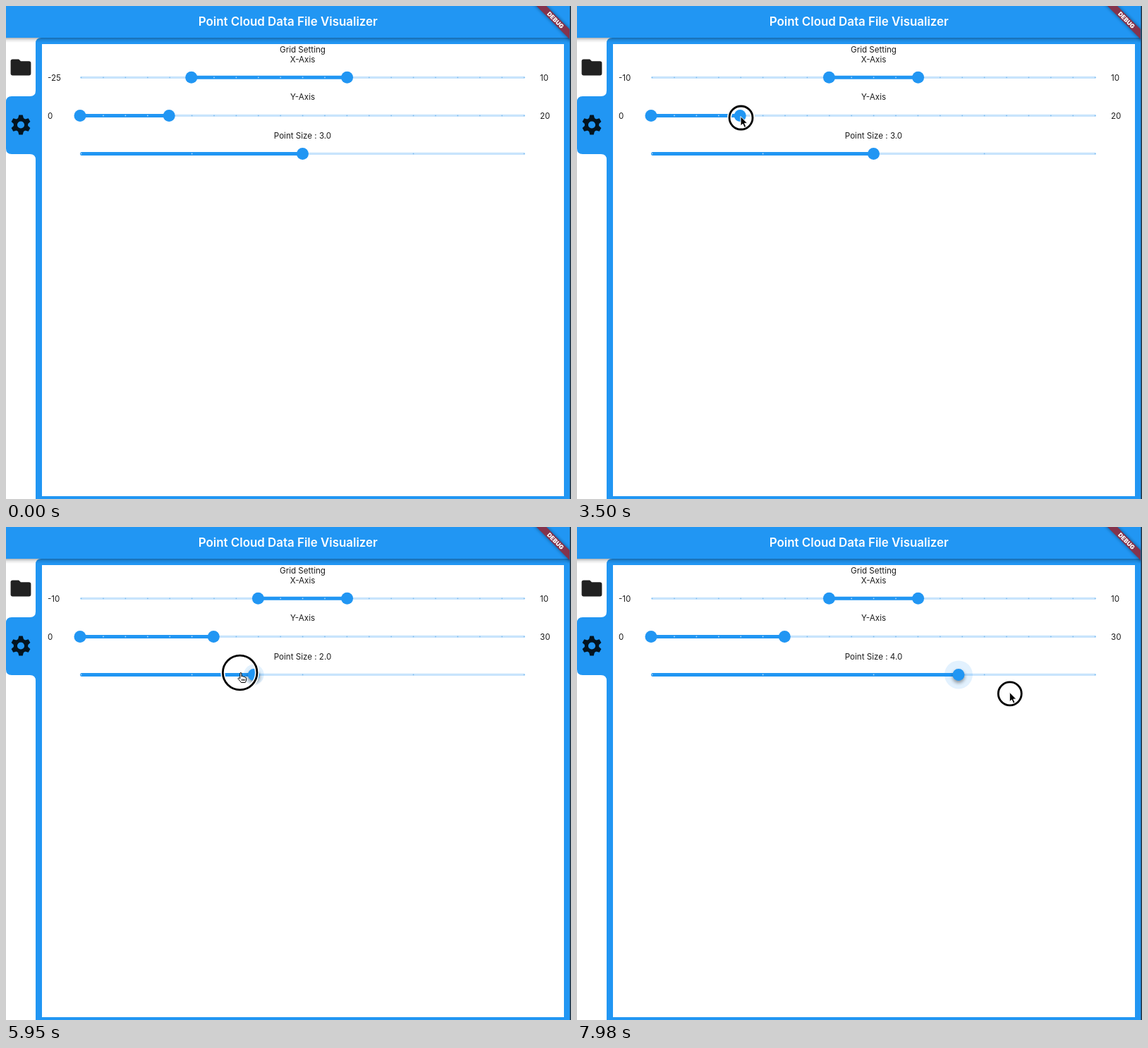
Write an HTML page that moves like this. It is 801 by 699 pixels and loops after 8000 ms.

```html
<!DOCTYPE html>
<html lang="en">
<head>
<meta charset="utf-8">
<title>Point Cloud Data File Visualizer</title>
<style>
  html, body { margin: 0; width: 100%; height: 100%; overflow: hidden; background: #fff; }
  svg { display: block; width: 801px; height: 699px; }
  text { font: 11.6px Inter, "Open Sans", sans-serif; fill: #1c1c1c; }
  .mid { text-anchor: middle; }
  .title { font-size: 16.9px; font-weight: 600; fill: #fff; }
  .debug { font-size: 8.4px; font-weight: 900; fill: #fff; }
  .blue { fill: #2196f3; }
  .halo { fill: #2196f3; fill-opacity: .13; }
</style>
</head>
<body>
<svg viewBox="0 0 801 699">
  <defs>
    <linearGradient id="shade" x2="0" y2="1">
      <stop offset="0" stop-opacity=".3"/>
      <stop offset=".45" stop-opacity=".1"/>
      <stop offset="1" stop-opacity="0"/>
    </linearGradient>
    <filter id="blur" x="-50%" y="-50%" width="200%" height="200%"><feGaussianBlur stdDeviation="2.4"/></filter>
    <clipPath id="bar"><path d="M0 0H799V699H0z"/></clipPath>
  </defs>

  <!-- side tabs and panel -->
  <path class="blue" d="M800 45V699H42V218Q42 210 34 210H8Q0 210 0 202V136Q0 128 8 128H34Q42 128 42 120V53Q42 45 50 45z"/>
  <path fill="#fff" d="M51 54H791V695H51z"/>
  <path fill="#212121" transform="translate(3.7 69.7) scale(1.44)"
    d="M10 4H4Q2 4 2 6V18Q2 20 4 20H20Q22 20 22 18V8Q22 6 20 6H12z"/>
  <g id="gear" fill="#04141f" transform="translate(21 168.5) scale(1.42)">
    <circle r="5.4" fill="none" stroke="#04141f" stroke-width="3.6"/>
  </g>

  <!-- header -->
  <path fill="url(#shade)" d="M0 45H799V52H0z"/>
  <path class="blue" d="M0 0H800V45H0z"/>
  <text class="mid title" x="399.8" y="28">Point Cloud Data File Visualizer</text>
  <g clip-path="url(#bar)">
    <g transform="translate(799 0) rotate(45)">
      <path d="M-40 23.3H40V33.2H-40z" opacity=".45" filter="url(#blur)"/>
      <path fill="#84334c" d="M-40 23.3H40V33.2H-40z"/>
      <text class="mid debug" y="31.3">DEBUG</text>
    </g>
  </g>
  <path fill="#26303a" d="M799.5 0H801V699H799.5z"/>

  <text class="mid" x="420.5" y="66">Grid Setting</text>
  <text class="mid" x="420.5" y="79.6">X-Axis</text>
  <text class="mid" x="420.5" y="133.4">Y-Axis</text>
  <text class="mid" x="420.5" y="187.5" id="sizeText"></text>
  <text x="59" y="106.3" id="xLow"></text>
  <text x="757" y="106.3">10</text>
  <text x="59" y="160.4">0</text>
  <text x="757" y="160.4" id="yHigh"></text>

  <g id="sliders"></g>

  <g id="pointer">
    <g id="ring" fill="none">
      <circle cx=".5" cy="1.5" stroke="#fff" stroke-width="6"/>
      <circle cx=".5" cy="1.5" stroke="#000" stroke-width="2.8"/>
    </g>
    <path id="arrow" stroke="#fff" d="M0 -.5V13L3.1 10.2L5.3 15.2L7.7 14.1L5.5 9.3H9.6z"/>
    <path id="hand" fill="#fff" stroke="#000" stroke-linejoin="round"
      d="M.6 10V3Q.6 1.5 1.7 1.5Q2.8 1.5 2.8 3V7Q4.6 5.6 5.3 7.4Q7 6.4 7.5 8.2Q9.4 7.6 9.4 9.6V12Q9 14 8 15.5H2.2Q1 13.4 -2 10.5Q-2.4 8.6 -.6 9zM3.4 10.5V13M5.2 10.5V13M7 10.5V13"/>
  </g>
</svg>
<script>
const $ = id => document.getElementById(id);
const LOOP = 8000, STEP = 70, LEFT = 105, WIDTH = 631;
const PRESS_X = 1540, FREE_X = 2240, PRESS_Y = 3500, FREE_Y = 4620, HOVER = 4760, PRESS_SIZE = 5600;

const set = (el, attrs) => { for (const k in attrs) el.setAttribute(k, attrs[k]); };
const show = (el, on) => set(el, { visibility: on ? 'visible' : 'hidden' });
const clamp = (v, lo, hi) => Math.max(lo, Math.min(hi, v));
const place = share => LEFT + WIDTH * share;
function add(parent, tag, attrs) {
  const el = parent.appendChild(document.createElementNS('http://www.w3.org/2000/svg', tag));
  set(el, attrs);
  return el;
}

for (let a = 0; a < 360; a += 60)
  add($('gear'), 'path', { d: 'M-2.9 -6L-1.9 -9.8H1.9L2.9 -6z', transform: `rotate(${a})` });

class Slider {
  constructor(y, divisions, thumbs) {
    const g = add($('sliders'), 'g', { transform: `translate(0 ${y})` });
    add(g, 'rect', { x: LEFT, y: -1.6, width: WIDTH, height: 3.2, rx: 1.6, fill: '#c8e4fc' });
    this.active = add(g, 'rect', { class: 'blue', y: -2.5, height: 5, rx: 2.5 });
    this.ticks = [];
    for (let i = 0; i <= divisions; i++) {
      const x = 106.6 + 628 * i / divisions;
      this.ticks.push({ x, dot: add(g, 'circle', { cx: x, r: .85 }) });
    }
    this.halo = add(g, 'circle', { class: 'halo' });
    this.shadow = add(g, 'circle', { r: 8.5, cy: 3, opacity: .4, filter: 'url(#blur)' });
    this.thumbs = Array.from({ length: thumbs }, () => add(g, 'circle', { class: 'blue', r: 8.5 }));
  }
  draw(from, to, held, haloSize, raised = false) {
    set(this.active, { x: from, width: to - from });
    for (const { x, dot } of this.ticks)
      set(dot, { fill: x > from && x < to ? '#b9dffb' : '#7dbcf0' });
    this.thumbs.forEach((thumb, i) => set(thumb, { cx: i ? from : to }));
    set(this.halo, { cx: held, r: haloSize });
    set(this.shadow, { cx: held });
    show(this.shadow, raised);
  }
}
const xAxis = new Slider(101.3, 20, 2);
const yAxis = new Slider(155.4, 20, 2);
const size = new Slider(209.4, 4, 1);

// Pointer moves: start, end, x, y
const moves = [
  [70, 210, 388, 174], [350, 490, 335, 103], [630, 1400, 272, 102],
  [PRESS_X, FREE_X, 354, 104], [2310, 2730, 232, 157],
  [PRESS_Y, 4410, 288, 158], [FREE_Y, 5250, 381, 205],
  [PRESS_SIZE, 6510, 230, 205], [6580, 7350, 170, 212], [7630, LOOP, 617, 235]
];

function pointerAt(t) {
  let x = 372, y = 602;
  for (const [start, end, toX, toY] of moves) {
    const u = clamp((t - start) / (end - start), 0, 1), ease = u * u * (3 - 2 * u);
    x += (toX - x) * ease;
    y += (toY - y) * ease;
  }
  return { x, y };
}

// Nearest division under the pointer
const snap = (t, divisions) => Math.round((pointerAt(t).x - LEFT) / WIDTH * divisions);
const sizeLevel = t => t < PRESS_SIZE ? 2 : clamp(snap(t, 4), 0, 4);

// The thumb trails its level, easing out over the lag
function sizeThumb(t, lag = 265, samples = 40) {
  let sum = 0, total = 0;
  for (let i = 0; i < samples; i++) {
    const s = (i + .5) / samples, weight = (1 - s) ** 2;
    sum += weight * sizeLevel(t - s * lag);
    total += weight;
  }
  return place(sum / total / 4);
}

function draw(t) {
  const { x, y } = pointerAt(t);
  const dragX = t >= PRESS_X && t < FREE_X;
  const dragY = t >= PRESS_Y && t < FREE_Y;
  const dragSize = t >= PRESS_SIZE;
  const halo = start => clamp((t - start) * .041, 0, 20);

  const low = t < PRESS_X ? 5 : dragX ? clamp(snap(t, 20), 5, 8) : 8;
  const high = t < PRESS_Y ? 4 : dragY ? clamp(snap(t, 20), 4, 6) : 6;
  const lowX = place(low / 20), highX = place(high / 20), thumb = sizeThumb(t);
  xAxis.draw(lowX, place(.6), lowX, dragX ? halo(PRESS_X) : 0);
  yAxis.draw(LEFT, highX, highX, dragY ? halo(PRESS_Y) : 0);
  size.draw(LEFT, thumb, thumb, halo(dragSize ? PRESS_SIZE : HOVER), dragSize);

  $('xLow').textContent = low * 5 - 50;
  $('yHigh').textContent = high * 5;
  $('sizeText').textContent = `Point Size : ${sizeLevel(t) + 1}.0`;

  const hand = t > HOVER && y > 190 && y < 226;
  set($('pointer'), { transform: `translate(${x} ${y})`, display: t < STEP ? 'none' : 'inline' });
  show($('arrow'), !hand);
  show($('hand'), hand);
  show($('ring'), dragX || dragY || dragSize);
  for (const c of $('ring').children) set(c, { r: hand ? 24.3 : 16.5 });
}

function tick() {
  const t = performance.now() % LOOP;
  draw(Math.floor(t / STEP) * STEP);
  requestAnimationFrame(tick);
}
tick();
</script>
</body>
</html>
```
